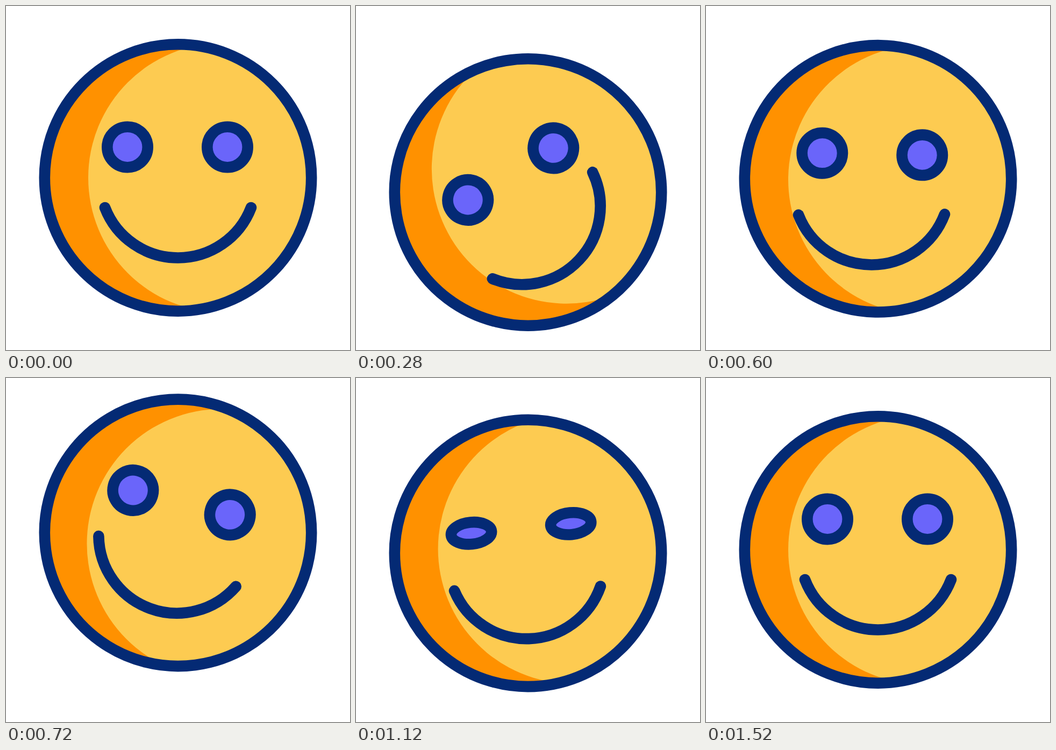
Animation, 640 px wide and 640 px high, one loop 2 s. Source, as an HTML page:

```html
<!DOCTYPE html>
<html lang="en">
<head>
<meta charset="utf-8">
<title>Nodding smiley</title>
<style>
  html, body { margin: 0; width: 100%; height: 100%; overflow: hidden; background: #fff; }
  svg { display: block; width: 100vw; height: 100vh; }
  .line { stroke: #042a74; stroke-width: 20.6; stroke-linecap: round; fill: none; }
  .eye { fill: #6a65fa; }
</style>
</head>
<body>
<svg viewBox="0 0 640 640">
  <defs><clipPath id="disc"><circle r="248.2"/></clipPath></defs>
  <g id="head">
    <circle r="248.2" fill="#ff9100"/>
    <g clip-path="url(#disc)"><circle cx="83.7" r="250.7" fill="#fdcb51"/></g>
    <circle class="line" r="248.2"/>
  </g>
  <g id="face">
    <ellipse class="line eye" cx="-94" cy="-57" rx="37.7" ry="37.7"/>
    <ellipse class="line eye" cx="92" cy="-57" rx="37.7" ry="37.7"/>
    <path id="mouth" class="line" d="M-136 55.5A145.7 145.7 0 0 0 136 55.5"/>
  </g>
</svg>
<script>
const LOOP = 2000, STEP = 40, REST = 1500;
const EYE = 37.7;

const head = document.getElementById('head');
const face = document.getElementById('face');
const mouth = document.getElementById('mouth');
const eyes = document.querySelectorAll('.eye');

// Smooth 0 to 1 between two times.
function ramp(t, from, to) {
  const u = Math.min(1, Math.max(0, (t - from) / (to - from)));
  return u * u * (3 - 2 * u);
}

// Rises from zero to a peak, then falls back to zero.
const swell = (t, from, peak, to) => ramp(t, from, peak) - ramp(t, peak, to);

function draw(t) {
  // Dip, hop and landing.
  const y = 319.5
    + 38.5 * swell(t, 0, 440, 760)
    - 34.8 * swell(t, 440, 760, 940)
    + 8.5 * swell(t, 760, 940, REST);

  // Lean left, swing right, settle.
  const tilt =
    -33 * swell(t, 0, 325, 750)
    + 14.8 * swell(t, 325, 750, 1040)
    - 6 * swell(t, 750, 1040, REST);

  // The face slides over the head, a little behind it.
  const dx =
    -11.3 * swell(t, 150, 660, 870)
    + 13.3 * swell(t, 660, 870, 1090)
    - 6.5 * swell(t, 870, 1090, REST);
  const dy =
    20.6 * swell(t, 0, 440, 850)
    - 7.3 * swell(t, 440, 850, 1080)
    + 10.8 * swell(t, 850, 1080, REST);

  const smile = -16.2 * swell(t, 0, 320, 810) + 8.2 * swell(t, 320, 810, 1400);
  const blink = 0.92 * swell(t, 1040, 1200, 1360);

  head.setAttribute('transform', `translate(320 ${y}) rotate(${tilt})`);
  face.setAttribute('transform', `translate(${320 + dx} ${y + dy}) rotate(${tilt})`);
  mouth.setAttribute('transform', `rotate(${smile} 0 55.5)`);
  eyes.forEach(eye => eye.setAttribute('ry', EYE * (1 - blink)));
}

const start = performance.now();
function tick() {
  const t = (performance.now() - start) % LOOP;
  draw(Math.floor(t / STEP) * STEP);
  requestAnimationFrame(tick);
}
draw(0);
requestAnimationFrame(tick);
</script>
</body>
</html>
```
